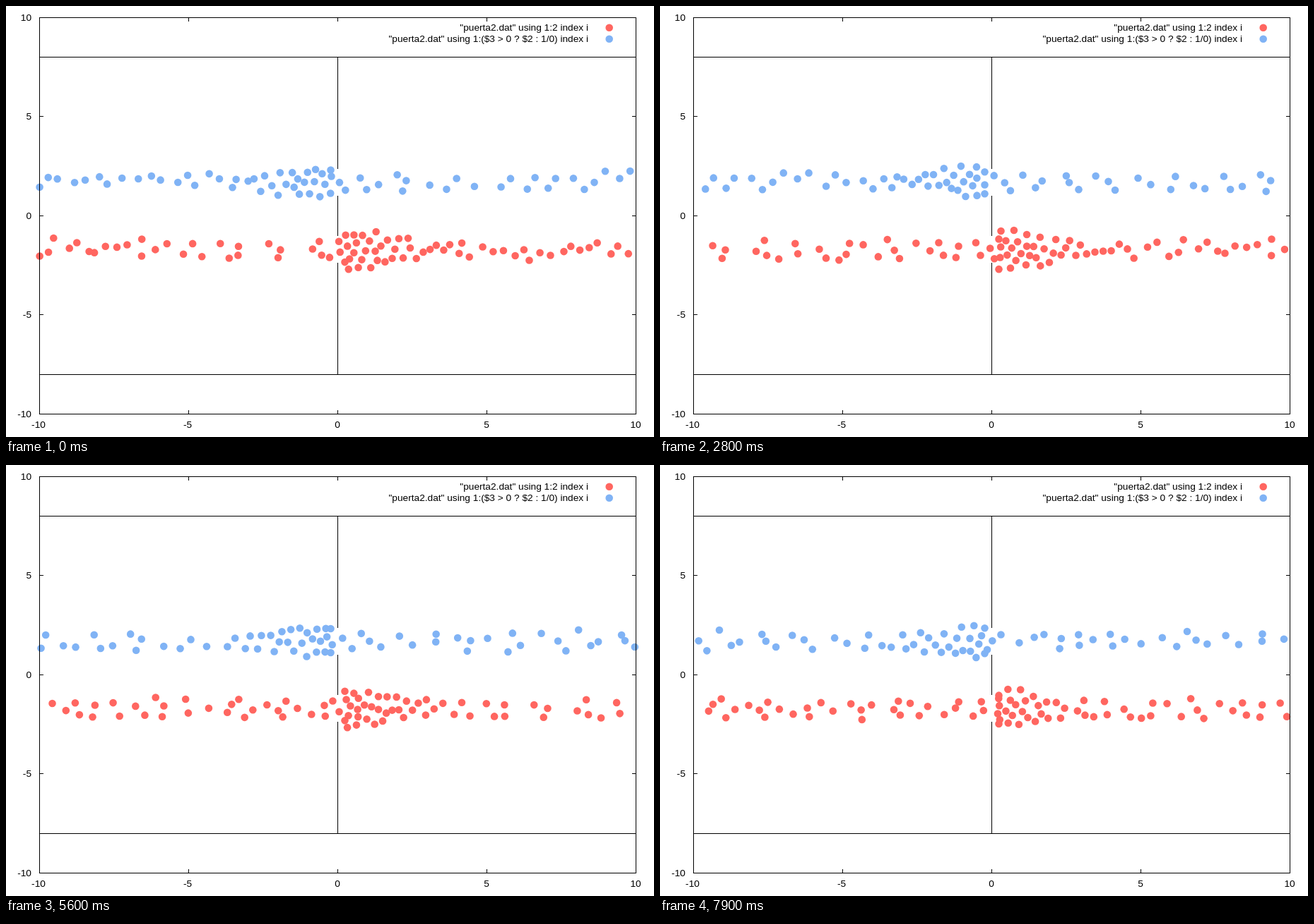
An HTML page with a canvas for the animation above (8000 ms loop, 917x611 px).

```html
<!DOCTYPE html>
<html lang="en">
<head>
<meta charset="utf-8">
<title>Two lanes through two doors</title>
<style>
  html, body { margin: 0; width: 100%; height: 100%; overflow: hidden; background: #fff; }
  canvas, svg { position: absolute; left: 0; top: 0; width: 917px; height: 611px; }
  text { font: 13.7px "Liberation Sans", Arial, sans-serif; fill: #000; }
  path { fill: none; stroke: #000; stroke-width: 1; shape-rendering: crispEdges; }
  .end { text-anchor: end; }
  .mid { text-anchor: middle; }
</style>
</head>
<body>
<canvas id="dots" width="917" height="611"></canvas>
<svg id="plot" viewBox="0 0 917 611">
  <path d="M47.5 16.5H891.5V578.5H47.5Z"/>
  <path d="M47 72.5H892M47 522.5H892"/>
  <path d="M469.5 72V231M469.5 269V326M469.5 364V523"/>
  <path id="ticks"/>
  <text class="end" x="824" y="35">"puerta2.dat" using 1:2 index i</text>
  <text class="end" x="824" y="51">"puerta2.dat" using 1:($3 &gt; 0 ? $2 : 1/0) index i</text>
  <circle cx="853.7" cy="30.8" r="5.3" fill="#ff6660"/>
  <circle cx="853.7" cy="46.8" r="5.3" fill="#80b3f5"/>
</svg>
<script>
const LEFT = 47, RIGHT = 891, DOOR = 469;
const SPAN = 970;        // length of the periodic corridor, wider than the plot
const GAP = 15;          // half width of a door, less the walker's own size
const STANDOFF = 10;     // closest a blocked walker gets to the wall
const FRAMES = 80, FRAME_MS = 100, SUBSTEPS = 4, WARM_UP = 30;

// Walking pace in px per frame against the distance past the door.
const PACE = [[-220, 10.6], [-150, 7.5], [-100, 5], [-60, 2.9], [-15, 2.5], [0, 5], [35, 10.6]];

const clamp = (v, lo, hi) => Math.min(hi, Math.max(lo, v));

function seeded(seed) {
  return () => {
    seed = (seed + 0x6d2b79f5) | 0;
    let t = Math.imul(seed ^ (seed >>> 15), 1 | seed);
    t = (t + Math.imul(t ^ (t >>> 7), 61 | t)) ^ t;
    return ((t ^ (t >>> 14)) >>> 0) / 4294967296;
  };
}

function pace(u) {
  if (u <= PACE[0][0]) return PACE[0][1];
  for (let i = 1; i < PACE.length; i++) {
    const [a, va] = PACE[i - 1], [b, vb] = PACE[i];
    if (u < b) return va + (vb - va) * (u - a) / (b - a);
  }
  return PACE[PACE.length - 1][1];
}

// Distances reached after each quarter frame of one undisturbed lap.
function lapTrack() {
  const track = [];
  for (let u = -SPAN / 2; u < SPAN / 2; u += pace(u) / 4) track.push(u);
  return track;
}

// Walkers set out at nearly even intervals, so they bunch up where the pace drops.
// u runs along the walk with the door at 0, v across it.
function spawn(count, random) {
  const track = lapTrack();
  return Array.from({ length: count }, (_, i) => {
    const phase = (i + 0.9 * random()) / count;
    const home = 20 * (random() + random() - 1) + 6 * (random() - 0.5);
    return {
      u: track[Math.floor(phase * track.length)],
      v: home,
      home,
      room: 14 + 13 * random()
    };
  });
}

function makeLane({ count, seed, dir, centre, color }) {
  const walkers = spawn(count, seeded(seed));
  const frames = [];
  for (let n = -WARM_UP; n < FRAMES; n++) {
    if (n >= 0) frames.push(walkers.map(w => [DOOR + dir * w.u, centre + w.v]));
    for (let s = 0; s < SUBSTEPS; s++) advance(walkers, 1 / SUBSTEPS);
  }
  return { frames, color };
}

// Head for the door, or drift back to one's own line once through it.
function steer(w) {
  const speed = pace(w.u);
  if (w.u >= 0) {
    w.su = speed;
    w.sv = 0.03 * (w.home - w.v);
    return;
  }
  const dv = clamp(w.v, -10, 10) - w.v;
  const len = Math.hypot(w.u, dv);
  w.su = speed * -w.u / len;
  w.sv = speed * dv / len;
}

function repel(w, walkers) {
  const push = w.u > -130 && w.u < 5 ? 2.6 : 0.25;
  for (const o of walkers) {
    const a = w.u - o.u, b = w.v - o.v, d = Math.hypot(a, b);
    const reach = (w.room + o.room) / 2;
    if (o === w || d >= reach || d < 0.01) continue;
    const f = push * (1 - d / reach) / d;
    w.su += 0.5 * f * a;
    w.sv += f * b;
  }
}

function advance(walkers, dt) {
  for (const w of walkers) {
    steer(w);
    repel(w, walkers);
  }
  for (const w of walkers) {
    const inDoor = Math.abs(w.u) < STANDOFF;
    const queued = w.u <= -STANDOFF;
    w.u += w.su * dt;
    w.v += w.sv * dt;
    if (inDoor) w.v = clamp(w.v, -GAP, GAP);
    else if (queued && w.u > -STANDOFF && Math.abs(w.v) > GAP) w.u = -STANDOFF;
    if (w.u > SPAN / 2) w.u -= SPAN;
  }
}

function drawAxes() {
  const plot = document.getElementById("plot");
  const label = (value, cls, x, y) => {
    const t = document.createElementNS("http://www.w3.org/2000/svg", "text");
    t.setAttribute("class", cls);
    t.setAttribute("x", x);
    t.setAttribute("y", y);
    t.textContent = value;
    plot.append(t);
  };
  let d = "";
  for (let k = -10; k <= 10; k += 5) {
    const x = Math.floor(DOOR + k * 42.2) + 0.5, y = Math.floor(297 - k * 28.1) + 0.5;
    label(k, "mid", x - (k < 0 ? 1.5 : 0.5), 598);
    label(k, "end", 36, y + 4.5);
    if (Math.abs(k) < 10) d += `M${x} 16v6m0 551v6M47 ${y}h6m833 0h6`;
  }
  document.getElementById("ticks").setAttribute("d", d);
}

const lanes = [
  { count: 89, seed: 7, dir: -1, centre: 345, color: "#ff6660" },
  { count: 71, seed: 21, dir: 1, centre: 250, color: "#80b3f5" }
].map(makeLane);
const ctx = document.getElementById("dots").getContext("2d");
let shown = -1;

function draw(time) {
  const n = Math.floor(time / FRAME_MS) % FRAMES;
  if (n === shown) return;
  shown = n;
  ctx.clearRect(0, 0, 917, 611);
  for (const { frames, color } of lanes) {
    ctx.fillStyle = color;
    for (const [x, y] of frames[n]) {
      if (x < LEFT || x > RIGHT) continue;
      ctx.beginPath();
      ctx.arc(x + 0.5, y + 0.5, 5.3, 0, 2 * Math.PI);
      ctx.fill();
    }
  }
}

drawAxes();
const begin = performance.now();
function tick() {
  draw(performance.now() - begin);
  requestAnimationFrame(tick);
}
tick();
</script>
</body>
</html>
```
